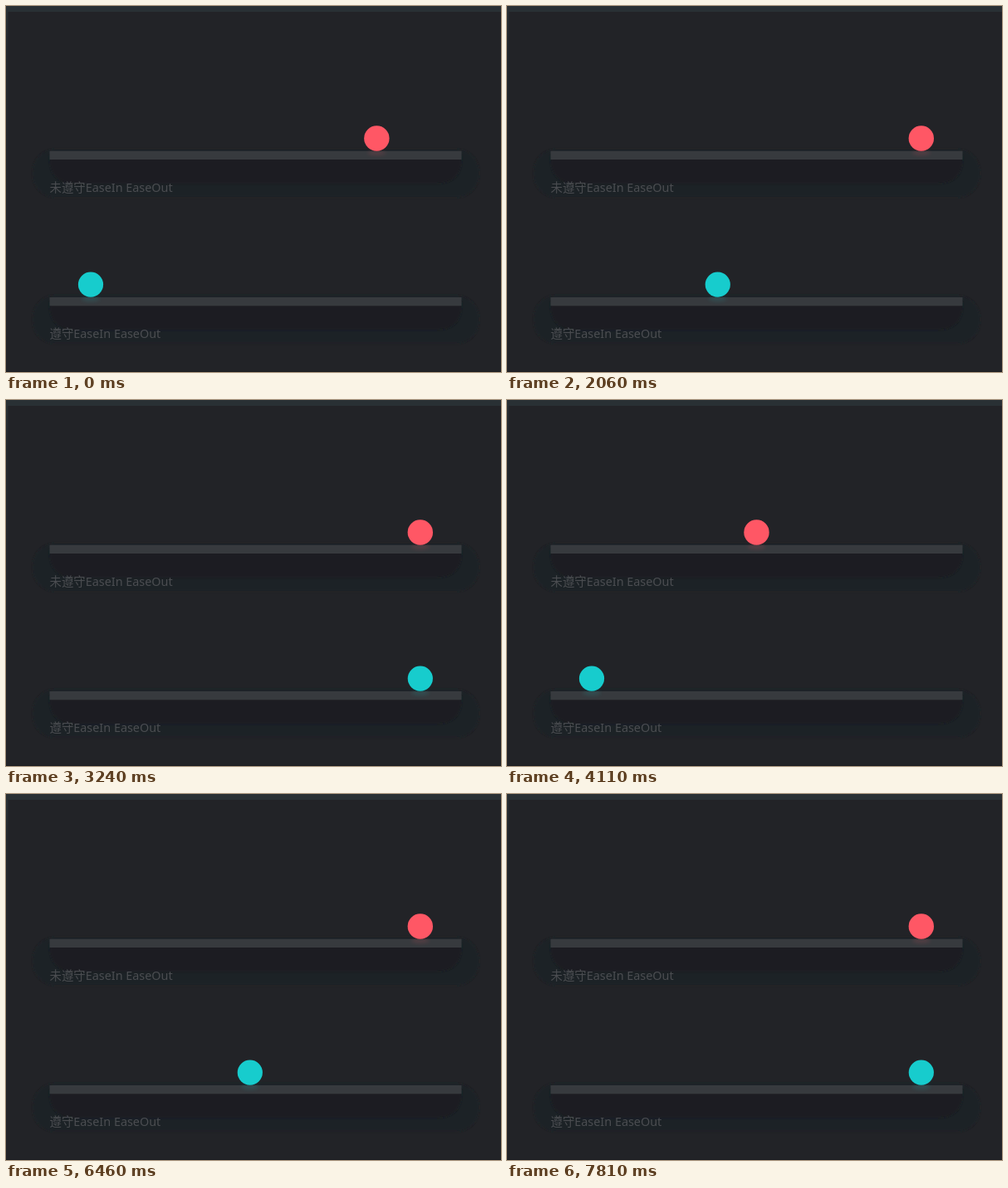
Animation, 596 px wide and 441 px high, one loop 8 s. Source, as an HTML page:

```html
<!DOCTYPE html>
<html lang="zh-CN">
<head>
<meta charset="utf-8">
<title>EaseIn EaseOut</title>
<style>
  html, body { margin: 0; width: 100%; height: 100%; overflow: hidden; background: #222327; }
  svg { display: block; width: 100vw; height: 100vh; }
  text { font: 14.4px "Noto Sans", "Noto Sans CJK SC", "Noto Sans CJK", sans-serif; fill: #4b4d51; }
</style>
</head>
<body>
<svg viewBox="0 0 596 441">
  <defs>
    <filter id="soft" x="-50%" y="-100%" width="200%" height="300%">
      <feGaussianBlur stdDeviation="2"/>
    </filter>
    <filter id="edge"><feGaussianBlur stdDeviation="0.8"/></filter>
    <linearGradient id="side" x2="0" y2="1">
      <stop offset="0" stop-color="#293034"/>
      <stop offset="0.12" stop-color="#23272c"/>
      <stop offset="1" stop-color="#222328"/>
    </linearGradient>
    <g id="track">
      <rect x="32" y="172.5" width="537.5" height="58" rx="27" fill="#1f2225" filter="url(#edge)"/>
      <path d="M52.5 180H548.5V187Q547 214 518 214H83Q54 214 52.5 187Z" fill="#1b1e22" filter="url(#edge)"/>
      <rect x="52.5" y="174.7" width="496" height="10.3" fill="#373a3e"/>
    </g>
  </defs>
  <rect width="596" height="441" fill="#222327"/>
  <rect width="2.5" height="441" fill="url(#side)"/>
  <rect width="596" height="7" fill="#293034"/>
  <rect y="440" width="596" height="1" fill="#1c1d21"/>

  <use href="#track"/>
  <use href="#track" y="176.3"/>
  <text x="52.5" y="224">未遵守EaseIn EaseOut</text>
  <text x="52.5" y="399.7">遵守EaseIn EaseOut</text>

  <g id="red" fill="#ff5765">
    <ellipse cy="177" rx="11" ry="3" opacity="0.13" filter="url(#soft)"/>
    <circle cy="159.5" r="15.2"/>
  </g>
  <g id="teal" fill="#17cccd">
    <ellipse cy="353" rx="11" ry="3" opacity="0.13" filter="url(#soft)"/>
    <circle cy="335.6" r="15.1"/>
  </g>
</svg>
<script>
const LOOP = 8000, STEP = 146.7;              // playback length and picture rate, ms
const CYCLE = 4366.8, CYCLE_START = 3755;     // both balls reset at the cycle start
const RED_TIME = 705, TEAL_DELAY = 2506.3, TEAL_TIME = 1000;
const LEFT = 102, RIGHT = 498.8;

const red = document.getElementById("red");
const teal = document.getElementById("teal");
const clamp = v => Math.min(1, Math.max(0, v));

// cubic-bezier(0.2, 0, 0, 1)
function ease(p) {
  let lo = 0, hi = 1;
  for (let i = 0; i < 24; i++) {
    const s = (lo + hi) / 2;
    if (0.6 * s * (1 - s) ** 2 + s ** 3 < p) lo = s; else hi = s;
  }
  return lo * lo * (3 - 2 * lo);
}

function place(ball, p) {
  const x = LEFT + (RIGHT - LEFT) * p;
  ball.setAttribute("transform", `translate(${x.toFixed(2)} 0)`);
}

function draw(ms) {
  const held = Math.floor((ms % LOOP) / STEP) * STEP;
  const t = (held - CYCLE_START + CYCLE) % CYCLE;
  place(red, clamp(t / RED_TIME));
  const p = clamp((t - TEAL_DELAY) / TEAL_TIME);
  place(teal, p < 1 ? ease(p) : 1);
}

const start = performance.now();
function tick() {
  draw(performance.now() - start);
  requestAnimationFrame(tick);
}
tick();
</script>
</body>
</html>
```
